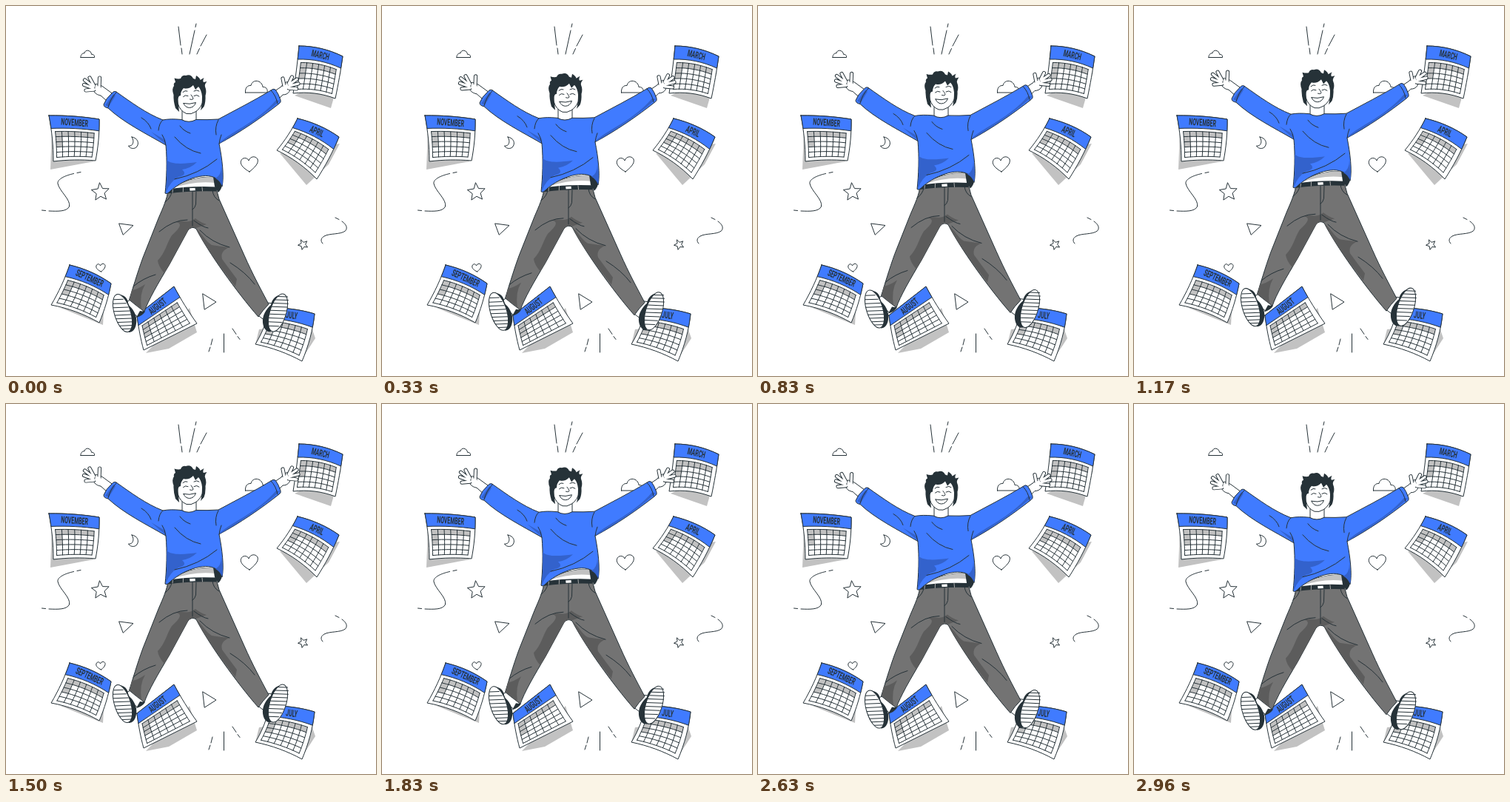
An HTML page that plays this animation: 500x500 px, repeating every 3 s.

```html
<!DOCTYPE html>
<html lang="en">
<head>
<meta charset="utf-8">
<title>Jumping through the months</title>
<style>
  html, body { margin: 0; width: 100%; height: 100%; overflow: hidden; background: #fff; }
  svg { display: block; width: 100%; height: 100%; }
  svg * { stroke-linejoin: round; stroke-linecap: round; }
  .line { fill: none; stroke: #263238; stroke-width: 1; }
  .white { fill: #fff; stroke: #263238; stroke-width: 1; }
  .blue { fill: #407bff; stroke: #263238; stroke-width: 1; }
  .navy { fill: #3362cc; }
  .grey { fill: #737373; stroke: #263238; stroke-width: 1; }
  .shade { fill: #5c5c5c; }
  .pale { fill: #c2c2c2; }
  .dark { fill: #263238; }
  .rim { fill: none; stroke: #263238; stroke-width: 5.2; }
  .skin { fill: none; stroke: #fff; stroke-width: 3.3; }
  text { font: 700 13px Roboto, "Liberation Sans", sans-serif; fill: #263238; text-anchor: middle; }
</style>
</head>
<body>
<svg viewBox="0 0 500 500">
  <defs>
    <path id="leftHand" d="M119 108 L113 97 M118 109 L106.5 100 M118 111 L105.5 106.5 M119 113 L108 114 M126 110 L126.5 97"/>
    <path id="rightHand" d="M382 105 L386.5 96 M383 106 L393 99 M383 108 L395 105 M382 111 L392.5 112 M376 108 L374 98"/>
  </defs>

  <g class="line">
    <path d="M101 69.5 H119.5 C120 66.5 118 65 115.5 65.3 C115 59.5 107 58 106 63.8 C103 63.3 100.5 66.5 101 69.5Z"/>
    <path d="M323.5 117 H353 C354 112 351 109 347 109.5 C346 100 333 98 331 107.5 C326 107 323 111 323.5 117Z"/>
    <path d="M170 177 C178 178 181 186 176 191 C172 194 167 192 165.500 189 C171.500 190 174 183 170 177Z"/>
    <path d="M329 224 C322 220 316 215 317.5 209.5 C319 204.5 326 204 328 209 C330 203 337 202 340 207 C342 213 335 219 329 224Z"/>
    <path d="M128.5 359 C124 357 121 354 122 351 C123 348 126.5 348 127.5 351 C129 347.5 133 347.5 134 350.5 C134.5 353.5 131.5 357 128.500 359Z"/>
    <path d="M153 294 L172 296.500 L158.500 309Z M266 389 L284 400 L268.500 410Z"/>
    <path d="M233 28 L236 53 M237 57 L238 65 M257 24 L256 28.5 M255 33 L248 65 M271 39 L263 54 M261.5 57.5 L258 65"/>
    <path d="M279 450 L277 458 M276 461 L274 467 M294.5 443 V468 M306 436 L311 443.5 M313 446.5 L316 450.5"/>
    <path d="M101 224.5 L96 225.5 M91.5 226.5 C80 229 69 234 70 240 C72 250 88 262 85.5 271 C82 278 70 277.5 58 277 M53.5 276.5 L48.5 276"/>
    <path d="M445 286 L450 288.5 M454 291 C460 295 462 300 458.5 304 C452 309 437 307 430 311 C425 314 425 318 428 321"/>
    <path id="bigStar"/><path id="smallStar"/>
  </g>

  <g id="calendars"></g>

  <g id="jumper">
    <!-- shoes and socks -->
    <path class="white" d="M164 399 L171 396 L187 411 L178 420 L170 414Z"/>
    <path class="dark" d="M176 421 L181 412 L188 413 Q184 419 176 421Z"/>
    <path class="white" d="M340 417 L353 401 L360 402 L349 424Z"/>
    <path class="dark" d="M149 389.5 C160 389 166 396 165 404 C171 408 178 418 176 429 C175 437 171 441 166 441Z"/>
    <path class="dark" d="M377 389.5 C366 389 359 396 358 404 C352 409 346 418 347 428 C348 437 353 441 358 440Z"/>
    <g id="soles"></g>

    <!-- trousers -->
    <path class="grey" d="M219 249 C218 260 212 273 206 287 L185 340 C177 362 171 383 166.5 397 Q176 405 187 413 C192 398 206 374 221 349 L246 303 Q251 297 257 301 C272 331 312 387 341 420 Q347 411 355 403 C344 382 334 364 322 337 L288 261 L284 246Z"/>
    <path class="shade" d="M251 290 C243 293 236 289 230 292 C240 294 233 302 224 310 C217 321 215 334 205 344 Q206 352 214 361 L221 349 L246 303 Q251 297 257 300 L271 295 Q262 292 256 287Z"/>
    <path class="shade" d="M170 384 Q178 383 188 376 Q180 389 183 410 L167 397Z"/>
    <path class="shade" d="M257 301 C266 309 269 317 278 323 Q290 325 302 326 Q289 331 292 342 Q300 353 312 369 L310 379 C290 353 270 327 257 301Z"/>
    <path class="line" d="M252 251 V297 M257 251 L256.5 268 Q255 274 252 275 M279 249 Q280 259 288 263 M224 251 Q223 259 215 265 M245 289 Q226 289 207 305 M254 290 Q266 299 273 300 M262 303 Q278 320 302 326 M303 347 Q324 360 336 376 M172 379 Q185 368 202 363"/>

    <!-- undershirt and belt -->
    <path class="white" d="M219 249 Q245 230 283 231 L284 246 Q250 245 219 251Z"/>
    <path class="pale" d="M226 246 Q250 230 282 231 L283 239 Q254 236 226 246Z"/>
    <path class="dark" d="M280 231 L293 238 Q292 247 287 252 L282 244Z"/>
    <path class="dark" d="M219 247.5 Q250 243 284 244.5 L284.5 250.5 Q250 249.5 218.5 253.5Z"/>
    <path class="white" d="M248 245.7 L256 245.3 L256.3 249.8 L248.3 250.2Z"/>
    <path d="M239.5 245.5 L239.3 251 M265 245 L265.5 250 M225.5 247 L225 252" stroke="#aaa"/>

    <!-- hands -->
    <path class="white" d="M118 107 C122 104 126 106 131 109 L146 120 L137 129 L128 121 C122 120 116 116 118 107Z"/>
    <path class="white" d="M384 104 C380 101 376 103 372 109 L360 117 L366 128 L374 120 C382 120 386 114 384 104Z"/>
    <use href="#leftHand" class="rim"/><use href="#leftHand" class="skin"/>
    <use href="#rightHand" class="rim"/><use href="#rightHand" class="skin"/>
    <path d="M121 107.5 L127 109 L134 118 L128 118.5 L120 113Z M380 105 L374 109 L367 118 L374 117 L383 110Z" fill="#fff"/>

    <!-- neck and sweater -->
    <path class="white" d="M238 136 V154 Q247 161 257 154 V136Z"/>
    <path class="blue" d="M149 116 Q146 114 143 118 Q135 125 132 133 Q132 137 138 138 C158 157 190 173 216 188 C218 210 217 234 215 253 Q217 255 220 252 C236 236 268 223 284 233 Q290 237 292 244 C295 230 292 206 288 186 C316 171 345 151 369 132 Q372 130 371 127 Q368 118 364 113 Q361 111 358 114 C335 128 311 140 287 153 Q272 154 257 153.5 Q247 159 237 153.5 Q222 152 212 154 C189 145 169 130 149 116Z"/>
    <path class="navy" d="M217 208 C224 215 242 213 258 211 Q250 219 238 221 Q246 228 233 231 Q222 237 216 252 Q218 229 217 208Z"/>
    <path class="navy" d="M289 184 C306 169 342 155 365 127 L370 128 Q346 151 290 185Z"/>
    <path class="navy" d="M134 134 L145 119 L148 121 L139 136Z M196 170 L215 181 L216 187Z"/>
    <path class="navy" d="M283 233 Q291 229 291 216 L293 239 L292 243Q288 235 283 233Z"/>
    <path class="line" d="M149 117 Q141 125 138 137 M358 114 Q365 121 367 132 M212 154 Q207 158 206 168 M216 188 Q215 180 211 174 M228 177 Q243 195 263 199 M235 162 Q240 169 249 172 M287 154 Q282 163 284 174 M288 186 Q289 179 291 174 M228 234 Q261 227 285 207 M183 151 Q193 157 196 166"/>

    <!-- head -->
    <path class="white" d="M231 112 L232 131 Q235 142 244 145.5 Q250 147 256 143 Q264 138 267 126 L267 107 Q248 98 231 112Z"/>
    <path class="dark" d="M234 143 L229 138 Q226 128 226.500 120 Q223.500 112 227 108 Q226 104 229 103 L227.5 97.5 Q233 99 236 98 Q238 93 243 94 Q250 91.5 253 98 L256 99 L257 94 Q262 97 262.5 100 L267.5 97 Q265.5 101 267 103 L271.5 102 Q268 106 269 109 Q271.5 115 269.5 121 Q270 130 267.5 136 L263 141 Q265 134 265 122 Q264 113 260 109 L256 113 L253 107 Q247 113 240 111 Q236 115 236 121 Q232 121 232.5 129Z"/>
    <path class="line" d="M239 116.5 Q242 113.5 245 115 M254 115 Q258 112.5 261 115 M239.5 122.5 Q242 119.5 246 121.5 M254 121.5 Q258 119 261 122 M250 120 Q254 125 252.5 126 Q251 127 248.5 126"/>
    <path class="white" d="M240 131.5 Q248 133.5 256.5 130.5 Q254 137.500 247.500 137.500 Q242 137 240 131.500Z"/>
  </g>
</svg>
<script>
const byId = id => document.getElementById(id);
const pathOf = pts => 'M' + pts.map(p => p.map(n => n.toFixed(2)).join(' ')).join('L');
const shape = (kind, d) => `<path class="${kind}" d="${d}"/>`;

function star(cx, cy, r, turn) {
  const pts = Array.from({ length: 10 }, (_, i) => {
    const a = (turn + i * 36 - 90) * Math.PI / 180, k = i % 2 ? r * 0.46 : r;
    return [cx + k * Math.cos(a), cy + k * Math.sin(a)];
  });
  return pathOf(pts) + 'Z';
}

// A sheet is a four-cornered patch whose rows and sides are slightly bowed.
function calendar(name, [ax, ay, bx, by, cx, cy, dx, dy], bow, side, shadow) {
  const head = 0.28, cols = 6, rows = 5;
  const wide = Math.hypot(bx - ax, by - ay), tall = Math.hypot(dx - ax, dy - ay);
  const at = (u, v) => {
    const mix = (a, b, c, d) => (a * (1 - u) + b * u) * (1 - v) + (d * (1 - u) + c * u) * v;
    const up = bow * 4 * u * (1 - u) / tall, out = side * 4 * v * (1 - v) / wide;
    return [mix(ax, bx, cx, dx) + up * (ax - dx) + out * (bx - ax),
            mix(ay, by, cy, dy) + up * (ay - dy) + out * (by - ay)];
  };
  const run = (u0, v0, u1, v1) => Array.from({ length: 9 }, (_, i) =>
    at(u0 + (u1 - u0) * i / 8, v0 + (v1 - v0) * i / 8));
  const patch = (u0, v0, u1, v1) => pathOf([
    ...run(u0, v0, u1, v0), ...run(u1, v0, u1, v1), ...run(u1, v1, u0, v1), ...run(u0, v1, u0, v0)]) + 'Z';
  const U = i => 0.08 + 0.82 * i / cols, V = j => 0.35 + 0.57 * j / rows;

  let out = shape('pale', 'M' + shadow + 'Z') + shape('white', patch(0, 0, 1, 1)) +
    shape('blue', patch(0, 0, 1, head)) +
    shape('pale', patch(U(0), V(0), U(cols), V(1))) + shape('pale', patch(U(0), V(1), U(1), V(3)));
  let grid = '';
  for (let i = 0; i <= cols; i++) grid += pathOf(run(U(i), V(0), U(i), V(rows)));
  for (let j = 0; j <= rows; j++) grid += pathOf(run(U(0), V(j), U(cols), V(j)));
  out += shape('line', grid);

  const [x, y] = at(0.5, head / 2), tilt = Math.atan2(by - ay, bx - ax) * 180 / Math.PI;
  return out + `<text transform="translate(${x} ${y}) rotate(${tilt}) scale(.53 1)" y="4.6">${name}</text>`;
}

function sole(cx, cy, tilt) {
  let bars = '';
  for (let y = -21; y <= 21; y += 5.2) {
    const w = 10.6 * Math.sqrt(1 - (y / 26) ** 2);
    bars += `M${-w} ${y}L${w} ${y - tilt * w / 32}`;
  }
  return `<g transform="translate(${cx} ${cy}) rotate(${tilt})">
    <ellipse class="white" rx="11" ry="26.5"/><path class="line" d="${bars}"/></g>`;
}

byId('bigStar').setAttribute('d', star(127.5, 251.5, 12.5, -4));
byId('smallStar').setAttribute('d', star(401.5, 322.5, 7, -24));
byId('soles').innerHTML = sole(157.5, 415, -17) + sole(367.5, 414.5, 17);
byId('calendars').innerHTML =
  calendar('NOVEMBER', [58, 148, 126, 153, 121, 209, 64, 210], 1.5, 1.5, '62 169L60 221L119 210') +
  calendar('MARCH', [396, 54, 455, 68, 445, 125, 388, 118], 3.5, 0.5, '390 121L439 138L453 88') +
  calendar('APRIL', [394, 152, 450, 177, 420, 234, 366, 195], 3, 1.5, '370 199L406 242L436 214L451 186') +
  calendar('SEPTEMBER', [86, 350, 142, 375, 126, 428, 61, 404], 3, 1.5, '74 408L131 431L133 396') +
  calendar('AUGUST', [177, 418, 227, 379, 258, 429, 186, 465], 0, -1, '189 469L220 463L258 441L248 408') +
  calendar('JULY', [356, 408, 417, 416, 400, 480, 337, 457], 2.5, 2.5, '342 437L337 457L403 472L418 449L411 429');

const jumper = byId('jumper'), loop = 3000, lift = 10;
function draw(now) {
  const p = now % loop / loop;
  jumper.setAttribute('transform', `translate(0 ${-lift * (1 - Math.abs(1 - 2 * p))})`);
  requestAnimationFrame(draw);
}
draw(performance.now());
</script>
</body>
</html>
```
